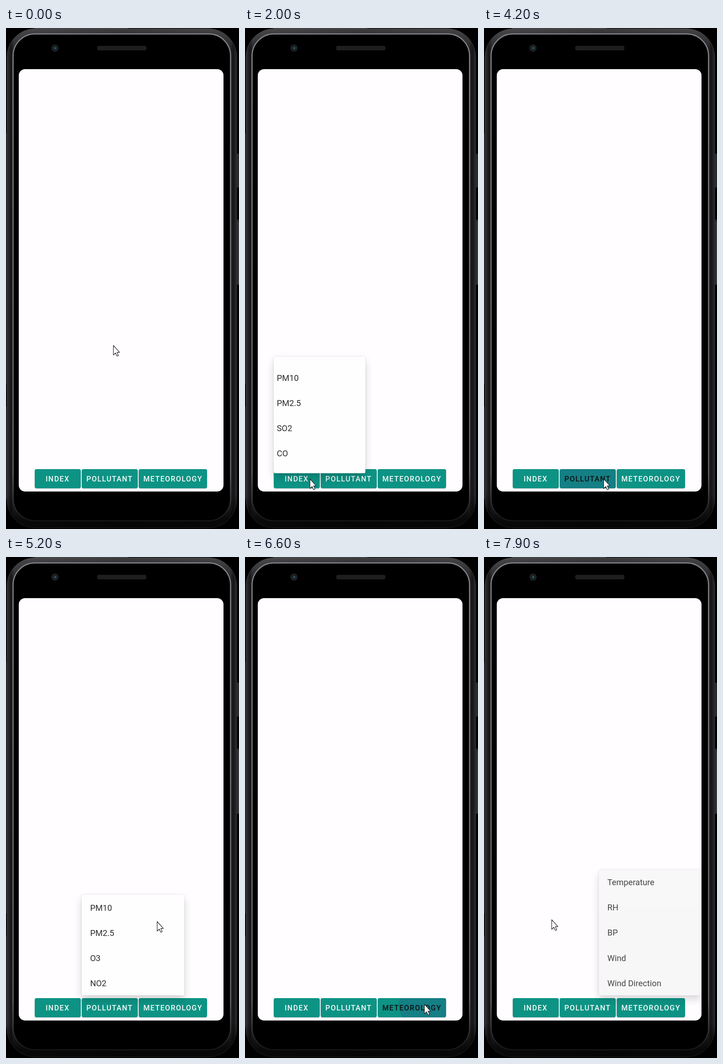
An HTML page that plays this animation: 511x1096 px, repeating every 8 s.

```html
<!DOCTYPE html>
<html lang="en">
<head>
<meta charset="utf-8">
<title>Drop-up menus</title>
<style>
  html, body { margin: 0; width: 100%; height: 100%; overflow: hidden; background: #000; }
  #stage { position: relative; width: 511px; height: 1096px; overflow: hidden; font-family: Roboto, sans-serif; }
  #phone { position: absolute; inset: 0; }
  #screen {
    position: absolute; left: 28px; top: 90px; width: 449px; height: 923.5px;
    border-radius: 14px; background: #fffdff; overflow: hidden;
  }
  /* Children of the layer use stage coordinates. */
  #layer { position: absolute; left: -28px; top: -90px; width: 511px; height: 1096px; }
  .button {
    position: absolute; top: 965px; height: 42px; border-radius: 4px;
    box-shadow: 0 1px 2px rgba(0, 0, 0, .2);
    font-size: 16px; font-weight: 500; letter-spacing: 1.43px; line-height: 43px;
    text-align: center; white-space: nowrap;
  }
  .menu {
    position: absolute; overflow: hidden; border-radius: 3px;
    box-shadow: 0 9px 18px rgba(0, 0, 0, .17), 0 0 3px rgba(0, 0, 0, .12);
  }
  .items { position: absolute; left: 50%; top: 50%; transform: translate(-50%, -50%); }
  .item {
    height: 55.1px; box-sizing: border-box; padding-left: 18.5px;
    font-size: 18.3px; line-height: 58px; color: #2c2c2e; white-space: nowrap;
  }
  #cursor { position: absolute; left: 0; top: 0; overflow: visible; }
</style>
</head>
<body>
<div id="stage">
  <svg id="phone" width="511" height="1096">
    <defs>
      <linearGradient id="rim">
        <stop offset="0" stop-color="#333336"/>
        <stop offset=".018" stop-color="#161618"/>
        <stop offset=".03" stop-color="#2c2c30"/>
        <stop offset=".5" stop-color="#1d1d20"/>
        <stop offset=".972" stop-color="#28282b"/>
        <stop offset=".985" stop-color="#151517"/>
        <stop offset="1" stop-color="#2c2c2f"/>
      </linearGradient>
      <linearGradient id="shade" x1="0" y1="0" x2="0" y2="1">
        <stop offset="0" stop-color="#fff" stop-opacity=".14"/>
        <stop offset=".04" stop-color="#fff" stop-opacity="0"/>
        <stop offset=".93" stop-color="#000" stop-opacity="0"/>
        <stop offset=".985" stop-color="#000" stop-opacity=".8"/>
      </linearGradient>
      <linearGradient id="edge" x1="0" y1="0" x2="0" y2="1">
        <stop offset="0" stop-color="#85858a"/>
        <stop offset=".9" stop-color="#66666b"/>
        <stop offset=".98" stop-color="#232325"/>
        <stop offset="1" stop-color="#161617"/>
      </linearGradient>
    </defs>
    <path d="M0 230V780M0 828V1030" stroke="#2a2a2d" stroke-width="3"/>
    <path d="M62 .5H268" stroke="#4a4a4d"/>
    <g fill="#29292c">
      <rect x="505" y="275" width="8" height="74" rx="2"/>
      <rect x="505" y="419" width="8" height="143" rx="2"/>
    </g>
    <path d="M510 424V560" stroke="#55555a"/>
    <rect x="2" y="1.5" width="504" height="1092" rx="62" fill="url(#rim)" stroke="#343437"/>
    <rect x="2" y="1.5" width="504" height="1092" rx="62" fill="url(#shade)"/>
    <rect x="15.5" y="13" width="477" height="1065" rx="48" fill="#000" stroke="url(#edge)" stroke-width="2.5"/>
    <circle cx="107.5" cy="44" r="8" fill="#1d1e20"/>
    <circle cx="107.5" cy="44" r="4.5" fill="#14282d"/>
    <circle cx="108" cy="44" r="2" fill="#35616a"/>
    <rect x="200" y="39" width="108" height="10" rx="4" fill="#1e1e20"/>
  </svg>
  <div id="screen"><div id="layer"></div></div>
  <svg id="cursor" width="16" height="26">
    <path d="M.5 .5V21.5L5.2 17L8.4 24L11.6 22.6L8.4 15.6H14.2Z" fill="#fff" stroke="#26262a" stroke-width="1.2" stroke-linejoin="round"/>
  </svg>
</div>
<script>
const LOOP = 8000, STEP = 100;
const ROW = 55.1, MENU_WIDTH = 224.5, MENU_BOTTOM = 959;
const BUTTON_TOP = 965;
// Touch area of a button, from which its menu unrolls
const ANCHOR_TOP = 958, ANCHOR_BOTTOM = 1014;
const TEAL = '#0d9384', PRESSED = '#147f84';

const controls = [
  { label: 'INDEX', left: 63, right: 163.5, menuLeft: 63, press: 1750, close: 3450,
    items: ['All', 'PM10', 'PM2.5', 'SO2', 'CO', 'O3'] },
  { label: 'POLLUTANT', left: 166, right: 288.5, menuLeft: 166, press: 4050, close: 5650,
    items: ['PM10', 'PM2.5', 'O3', 'NO2'] },
  { label: 'METEOROLOGY', left: 291, right: 441, menuLeft: 252, press: 6550, close: 7750,
    items: ['Temperature', 'RH', 'BP', 'Wind', 'Wind Direction'] }
];

// Pointer stops: time, x, y
const pointerPath = [
  [100, 235, 694], [1000, 150, 966], [1300, 142, 986], [2400, 142, 986],
  [3300, 341, 908], [3600, 341, 908], [4000, 262, 986], [4300, 262, 986],
  [5200, 331, 797], [5300, 338, 797], [5600, 405, 800], [5700, 405, 800],
  [6000, 393, 978], [6900, 393, 978], [7500, 148, 793]
];

const layer = document.getElementById('layer');
const cursor = document.getElementById('cursor');
const clamp = v => Math.min(1, Math.max(0, v));
const mix = (a, b, k) => a + (b - a) * k;
const smooth = k => k * k * (3 - 2 * k);
const easeOut = (k, power) => 1 - (1 - k) ** power;

function add(parent, className, text = '') {
  const el = document.createElement('div');
  el.className = className;
  el.textContent = text;
  return parent.appendChild(el);
}

for (const c of controls) {
  c.button = add(layer, 'button', c.label);
  c.button.style.left = c.left + 'px';
  c.button.style.width = c.right - c.left + 'px';
}
for (const c of controls) {
  c.height = ROW * c.items.length;
  c.menu = add(layer, 'menu');
  const list = add(c.menu, 'items');
  list.style.width = MENU_WIDTH + 'px';
  list.style.height = c.height + 'px';
  for (const text of c.items) add(list, 'item', text);
}

function pointerAt(t) {
  const next = pointerPath.findIndex(stop => stop[0] > t);
  if (next === 0) return pointerPath[0].slice(1);
  if (next < 0) return pointerPath[pointerPath.length - 1].slice(1);
  const [t0, x0, y0] = pointerPath[next - 1], [t1, x1, y1] = pointerPath[next];
  const k = smooth((t - t0) / (t1 - t0));
  return [mix(x0, x1, k), mix(y0, y1, k)];
}

function drawButton(c, t, [px, py]) {
  const age = t - c.press;
  const down = age > 0 && age < 200;
  const radius = age * 1.1;
  c.button.style.color = down ? '#0b1112' : '#f4fbfa';
  c.button.style.background = down
    ? `radial-gradient(circle at ${px - c.left}px ${py - BUTTON_TOP}px, ${PRESSED} ${radius}px, ${TEAL} ${radius + 1}px)`
    : TEAL;
}

// The menu unrolls from its button, then fades out.
function drawMenu(c, t) {
  const k = clamp((t - c.press - 160) / 350);
  const fade = clamp((t - c.close) / 300);
  const style = c.menu.style;
  style.display = k > 0 && fade < 1 ? 'block' : 'none';
  const kx = easeOut(k, 5.6), ky = easeOut(k, 4.35);
  const left = mix(c.left, c.menuLeft, kx);
  const right = mix(c.right, c.menuLeft + MENU_WIDTH, kx);
  const top = mix(ANCHOR_TOP, MENU_BOTTOM - c.height, ky);
  const bottom = mix(ANCHOR_BOTTOM, MENU_BOTTOM, ky);
  style.left = left + 'px';
  style.top = top + 'px';
  style.width = right - left + 'px';
  style.height = bottom - top + 'px';
  style.opacity = 1 - fade ** 3;
  const shade = 255 - 14 * fade;
  style.background = `rgb(${shade}, ${shade - 1}, ${shade})`;
}

const start = performance.now();
function draw(now) {
  const elapsed = Math.max(0, now - start) % LOOP;
  const t = Math.floor(elapsed / STEP) * STEP;
  const pointer = pointerAt(t);
  cursor.style.transform = `translate(${pointer[0]}px, ${pointer[1]}px)`;
  for (const c of controls) {
    drawButton(c, t, pointer);
    drawMenu(c, t);
  }
  requestAnimationFrame(draw);
}
draw(start);
</script>
</body>
</html>
```
